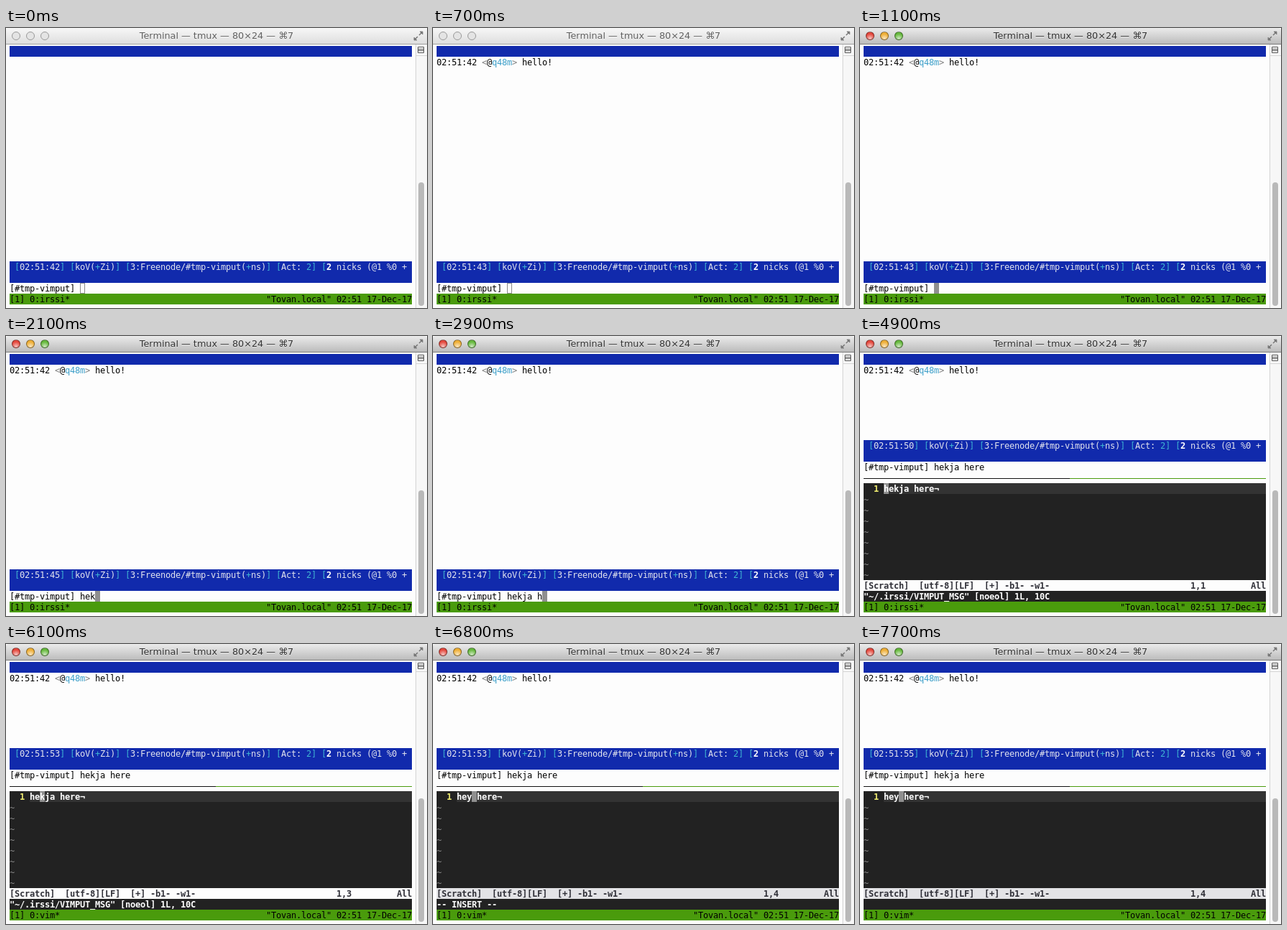
Recreate the animation shown at these times as an HTML page. Size 586 by 390 pixels, loop 8000 ms.

```html
<!DOCTYPE html>
<html lang="en">
<head>
<meta charset="utf-8">
<title>Terminal</title>
<style>
  html, body { margin: 0; width: 586px; height: 390px; overflow: hidden; background: #fdfdfd; }
  body { position: relative; }
  #bar {
    position: absolute; inset: 0 0 auto; height: 22px;
    background: linear-gradient(#ebebeb, #bcbcbc);
    border-bottom: 1px solid #7c7c7c; border-radius: 4px 4px 0 0;
    font: 12.8px/22px "DejaVu Sans", sans-serif; text-align: center; color: #333;
    text-shadow: 0 1px #ffffff80;
  }
  .idle #bar { background: linear-gradient(#f7f7f7, #dedede); border-color: #a0a0a0; color: #606060; }
  .light {
    position: absolute; top: 5px; width: 10px; height: 10px;
    border: 1px solid #00000070; border-radius: 50%;
    background: radial-gradient(circle at 50% 85%, #ffffffb0, #fff0 65%), var(--c);
  }
  .idle .light { background: #e4e4e4; border-color: #999; }
  svg { position: absolute; left: 0; top: 0; }
  #screen span, #screen div { position: absolute; }
  #screen span {
    font: 12px/16px "DejaVu Sans Mono", monospace;
    letter-spacing: calc(7px - 1ch); white-space: pre; color: #000;
  }
  #screen i { font-style: normal; color: #3fb4d2; }
  #screen .info { color: #e2e4ee; }
  #screen .info b { color: #fff; }
  #screen .nick i { color: #3c9fc9; }
  #screen .nick u { color: #808080; text-decoration: none; }
  #screen .vim { color: #fff; font-weight: bold; }
  #screen .num { color: #f0ec70; font-weight: bold; }
  #screen .tilde { color: #8a8a8a; }
  #screen .mode { color: #303038; font-weight: bold; }
</style>
</head>
<body class="idle">
<div id="bar">
  <div class="light" style="left:8px;--c:#e4473c"></div>
  <div class="light" style="left:28px;--c:#eeae35"></div>
  <div class="light" style="left:48px;--c:#65b83c"></div>
  Terminal — tmux — 80×24 — ⌘7
</div>
<svg width="586" height="390">
  <g fill="#777" stroke="#777" stroke-width="1.5">
    <path d="M575 10l4-4M573 12l-4 4" />
    <path d="M576 5h4v4zM568 13v4h4z" stroke-width=".8" />
  </g>
  <path d="M570 23h16v367h-16z" fill="#f7f7f7" />
  <path d="M570.5 23v367M570 38.5h16" stroke="#d4d4d4" />
  <path d="M573.5 26.5h8v8h-8zM574 29.5h8M574 31.5h8" fill="none" stroke="#555" />
  <rect x="574" y="215" width="8" height="172" rx="4" fill="#b9b9b9" />
</svg>
<div id="screen"></div>
<script>
const LOOP = 8000, LEFT = 5, TOP = 25, CELL = 7, ROW = 15;
const BLUE = '#112aac', GREEN = '#4a9b0c', DARK = '#222', BLOCK = '#8f8f8f';
const ACTIVE = 1000, HELLO = 200, SPLIT = 4900, RENAMED = 5100, CHANGED = 6500, LEAVE = 7200;

// times at which each further second, key or column is reached
const ticks = [700, 1200, 1700, 2300, 2800, 3400, 4100, 4700, 5200, 5600, 6100, 7100, 7700];
const keys = [1900, 2000, 2100, 2200, 2300, 2400, 2600, 3400, 3500, 3700];
const columns = [[0, 1], [6000, 2], [6100, 3], [6800, 4], [7200, 3], [7500, 4]];

const passed = (times, t) => times.filter(x => x <= t).length;
const latest = (steps, t) => steps.filter(s => s[0] <= t).pop()[1];

const text = (row, col, str, cls = '') =>
  `<span class="${cls}" style="left:${LEFT + col * CELL}px;top:${TOP + row * ROW}px">${str}</span>`;

const box = (row, col, cols, rows, color) =>
  `<div style="left:${LEFT + col * CELL}px;top:${TOP + row * ROW}px;` +
  `width:${cols * CELL}px;height:${rows * ROW}px;background:${color}"></div>`;

const rule = (col, cols, color) =>
  `<div style="left:${LEFT + col * CELL}px;top:198px;width:${cols * CELL}px;height:1px;background:${color}"></div>`;

const hollow = (row, col) =>
  `<div style="left:${LEFT + col * CELL}px;top:${TOP + row * ROW}px;` +
  `width:5px;height:13px;border:1px solid #8a8a8a"></div>`;

const sb = str => `<i>[</i>${str}<i>]</i>`;

function chat(t, row, typed) {
  const info = [
    sb('02:51:' + (42 + passed(ticks, t))),
    sb('koV(<i>+</i>Zi)'),
    sb('3:Freenode/#tmp-vimput(<i>+</i>ns)'),
    sb('Act: <i>2</i>'),
    '<i>[</i><b>2</b> nicks (@1 %0 +'
  ].join(' ');
  return box(0, 0, 80, 1, BLUE) +
    (t >= HELLO ? text(1, 0, '02:51:42 <u>&lt;</u>@<i>q48m</i><u>&gt;</u> hello!', 'nick') : '') +
    box(row, 0, 80, 2, BLUE) + text(row, 1, info, 'info') +
    text(row + 2, 0, '[#tmp-vimput] ' + typed);
}

function editor(t) {
  const col = latest(columns, t);
  const line = t < CHANGED ? 'hekja here' : t < 6800 ? 'he here' : 'hey here';
  const message = t < CHANGED ? '"~/.irssi/VIMPUT_MSG" [noeol] 1L, 10C'
    : t < LEAVE ? '-- INSERT --' : '';
  let out = rule(0, 41, '#111') + rule(41, 39, GREEN) +
    box(12, 0, 80, 11, DARK) + box(12, 4, 76, 1, '#333') +
    box(12, 3 + col, 1, 1, BLOCK) +
    text(12, 2, '1', 'num') + text(12, 4, line + '¬', 'vim');
  for (let row = 13; row < 21; row++) out += text(row, 0, '~', 'tilde');
  return out + box(21, 0, 80, 1, t < CHANGED ? '#fdfdfd' : '#e3e3e6') +
    text(21, 0, '[Scratch]  [utf-8][LF]  [+] -b1- -w1-', 'mode') +
    text(21, 65, '1,' + col, 'mode') + text(21, 77, 'All', 'mode') +
    text(22, 0, message, 'vim');
}

function view(t) {
  const typed = 'hekja here'.slice(0, passed(keys, t));
  const cursor = 14 + typed.length;
  const panes = t < SPLIT
    ? (t < ACTIVE ? hollow(22, cursor) : box(22, cursor, 1, 1, BLOCK)) + chat(t, 20, typed)
    : chat(t, 8, typed) + editor(t);
  return panes + box(23, 0, 80, 1, GREEN) +
    text(23, 0, `[1] 0:${t < RENAMED ? 'irssi' : 'vim'}*`) +
    text(23, 51, '"Tovan.local" 02:51 17-Dec-17');
}

const screenEl = document.getElementById('screen');
const start = performance.now();
let shown = '';

function draw(now) {
  const t = Math.max(0, now - start) % LOOP;
  const next = view(t);
  if (next !== shown) screenEl.innerHTML = shown = next;
  document.body.className = t < ACTIVE ? 'idle' : '';
  requestAnimationFrame(draw);
}
draw(start);
</script>
</body>
</html>
```
